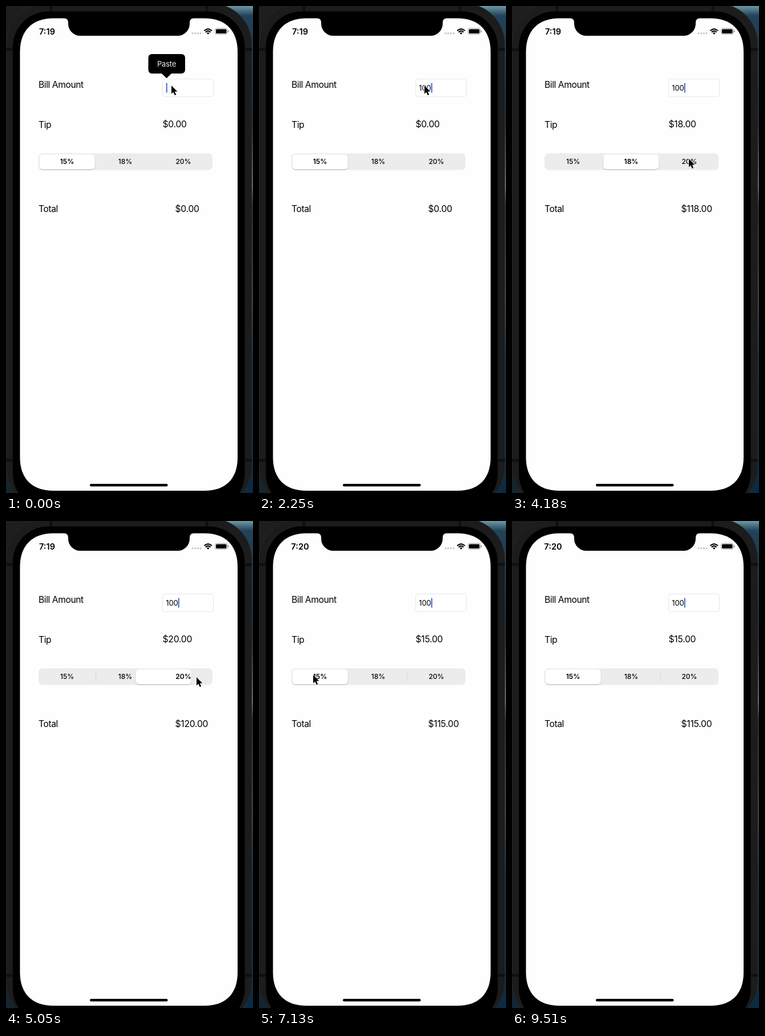
An HTML page for the animation above (9610 ms loop, 433 by 851 pixels).

```html
<!DOCTYPE html>
<html lang="en">
<head>
<meta charset="utf-8">
<title>Tip calculator</title>
<style>
  html, body { margin: 0; width: 100%; height: 100%; overflow: hidden; background: #17191c; }
  svg { display: block; width: 433px; height: 851px; }
  text { font: 15.7px Inter, "Liberation Sans", sans-serif; letter-spacing: -.45px; white-space: pre; }
  .mid { text-anchor: middle; }
  .money { letter-spacing: -.25px; }
  .clock { font-size: 14.6px; font-weight: 600; letter-spacing: 0; }
  .field { font-size: 13px; letter-spacing: -.2px; }
  .seg { font-size: 12px; font-weight: 500; letter-spacing: 0; }
  .seg.on { font-weight: 600; }
</style>
</head>
<body>
<svg viewBox="0 0 433 851">
  <defs>
    <linearGradient id="wall" x2="0" y2="1">
      <stop offset="0" stop-color="#6f98a4"/>
      <stop offset=".02" stop-color="#214259"/>
      <stop offset=".22" stop-color="#1a2d40"/>
      <stop offset=".24" stop-color="#2a2a2c"/>
      <stop offset=".37" stop-color="#666"/>
      <stop offset=".41" stop-color="#2b2928"/>
      <stop offset=".6" stop-color="#4b4038"/>
      <stop offset=".73" stop-color="#0a3350"/>
      <stop offset="1" stop-color="#0b2b45"/>
    </linearGradient>
    <filter id="soft" x="-20%" y="-30%" width="140%" height="180%">
      <feDropShadow dx="0" dy="1.2" stdDeviation="1.1" flood-opacity=".22"/>
    </filter>
  </defs>

  <!-- desktop and phone body -->
  <rect width="433" height="851" fill="#1d1e20"/>
  <rect x="340" width="93" height="851" fill="url(#wall)"/>
  <rect y="780" width="100" height="71" fill="#14252f"/>
  <rect x=".5" y="-4" width="430" height="880" rx="70" fill="#1c1c1c" stroke="#262626"/>
  <path d="M0 76H12M419 76H431M0 794H12M419 794H431M79 0V10M352 0V10" stroke="#101010" stroke-width="5"/>
  <rect x="12" y="9.5" width="406.500" height="870" rx="62"/>
  <path d="M24.500 80C24.500 43 46 21.500 83 21.500H348C385 21.500 406 43 406 80V789C406 826 385 847 348 847H83C46 847 24.500 826 24.500 789Z" fill="#fefefe"/>
  <path d="M102 21Q109 22 109 29V31A21 21 0 0 0 130 52H301A21 21 0 0 0 322 31V29Q322 22 329 21Z"/>

  <!-- status bar -->
  <text id="clock" class="clock mid" x="72" y="49.500"></text>
  <path d="M327 47.800h0M331.700 47.800h0M336.300 47.800h0M341 47.800h0" stroke="#c9c9c9" stroke-width="3.400" stroke-linecap="round"/>
  <g fill="none" stroke="#000" stroke-width="2.100">
    <path d="M347.500 43.300Q354.200 36.800 361 43.300"/>
    <path d="M349.900 45.800Q354.200 41.600 358.600 45.800"/>
  </g>
  <path d="M351.800 47.300Q354.200 45.200 356.700 47.300L354.200 49.800Z"/>
  <rect x="366.500" y="39" width="21.500" height="10.500" rx="3" fill="none" stroke="#a5a5a5"/>
  <rect x="368" y="40.500" width="18.500" height="7.500" rx="1.600"/>
  <path d="M389.500 42.500v3.500" stroke="#777" stroke-width="1.200"/>

  <!-- form -->
  <text x="57" y="143">Bill Amount</text>
  <text x="57" y="213">Tip</text>
  <text x="57" y="360">Total</text>
  <text id="tip" class="money" x="274.500" y="212"></text>
  <text id="total" class="money" x="296.500" y="360"></text>
  <rect x="274.500" y="127.500" width="89" height="31" rx="4" fill="#fff" stroke="#e6e6e6"/>
  <text id="bill" class="field" x="280.300" y="148"></text>
  <rect id="caret" y="134.500" width="2" height="17" rx=".8" fill="#4169de"/>

  <!-- segmented control -->
  <rect x="57" y="257.500" width="305" height="29" rx="7" fill="#ececec"/>
  <path id="div1" d="M157.500 264v16" stroke="#d7d7d7"/>
  <path id="div2" d="M260 264v16" stroke="#d7d7d7"/>
  <rect id="thumb" y="259.300" width="97.300" height="25.700" rx="6" fill="#fff" filter="url(#soft)"/>
  <text class="seg mid" x="107" y="276.400">15%</text>
  <text class="seg mid" x="209" y="276.400">18%</text>
  <text class="seg mid" x="311" y="276.400">20%</text>

  <rect x="147" y="835" width="136.500" height="4.600" rx="2.300"/>

  <g id="bubble">
    <path d="M256.500 84H307Q314 84 314 91V111Q314 118 307 118H290L281.500 126.300L273 118H256.500Q249.500 118 249.500 111V91Q249.500 84 256.500 84Z"/>
    <text class="field mid" x="281.600" y="105.800" fill="#eee">Paste</text>
  </g>
  <path id="cursor" d="M0 0V14.500L3.300 11.500L5.800 17L8.200 16L5.800 10.600H10.400Z" stroke="#fff" stroke-width="1.200" paint-order="stroke"/>
</svg>

<script>
// The screen refreshes every BEAT ms; all times below are counted in beats.
const LOOP = 9610, BEAT = 148.6, LEAD = 20;

const KEYS = [0, 3, 13, 15];
const TAPS = [
  { at: -99, seg: 0 }, { at: 22.4, seg: 1 }, { at: 31.7, seg: 2 }, { at: 42.6, seg: 0 }
];
const SLIDE = 3.77;
const RATES = [15, 18, 20];

// pointer moves: leave, arrive, x, y
const MOVES = [
  [0, 0, 290, 139], [17, 22, 209, 269], [26, 28, 310, 267], [28, 30, 334, 273],
  [35, 39, 73, 272], [39, 41, 95, 269], [51, 55, 280, 670], [56, 59, 440, 870]
];

const $ = id => document.getElementById(id);
const segs = document.querySelectorAll(".seg");
const clamp = v => Math.min(1, Math.max(0, v));
const smooth = u => u * u * (3 - 2 * u);
const mix = (a, b, u) => a + (b - a) * u;
const money = n => "$" + n.toFixed(2);

function pointer(n) {
  let [, , x, y] = MOVES[0];
  for (const [leave, arrive, nx, ny] of MOVES.slice(1)) {
    const u = clamp((n - leave) / (arrive - leave));
    x = mix(x, nx, u);
    y = mix(y, ny, u);
  }
  return [x, y];
}

// the blink restarts with each key press
function blink(n, pressed) {
  const phase = (n - pressed + 3) % 7;
  return clamp(.9 + 1.2 * Math.cos((phase - 2.5) / 7 * 2 * Math.PI));
}

function draw(n) {
  const typed = KEYS.findLastIndex(k => k <= n);
  $("bill").textContent = "100".slice(0, typed);
  $("caret").setAttribute("x", 280.7 + $("bill").getComputedTextLength());
  $("caret").setAttribute("opacity", blink(n, KEYS[typed]));
  $("bubble").setAttribute("opacity", clamp(1 - n / 3));

  const tap = TAPS.findLastIndex(p => p.at <= n);
  const { at, seg } = TAPS[tap];
  const from = tap ? TAPS[tap - 1].seg : seg;
  const pos = mix(from, seg, smooth(clamp((n - at) / SLIDE)));
  $("thumb").setAttribute("x", 58.3 + 101.8 * pos);
  segs.forEach((s, i) => s.classList.toggle("on", i === seg));
  $("div1").setAttribute("opacity", +(pos > 1.1));
  $("div2").setAttribute("opacity", +(tap === 3 && pos < .9));

  const tip = tap ? RATES[seg] : 0;
  $("tip").textContent = money(tip);
  $("total").textContent = money(tap ? 100 + tip : 0);
  $("clock").textContent = n < 44 ? "7:19" : "7:20";
  $("cursor").setAttribute("transform", `translate(${pointer(n)})`);
}

function tick() {
  const t = performance.now() % LOOP;
  draw(Math.floor((t + LEAD) / BEAT));
  requestAnimationFrame(tick);
}
tick();
</script>
</body>
</html>
```
